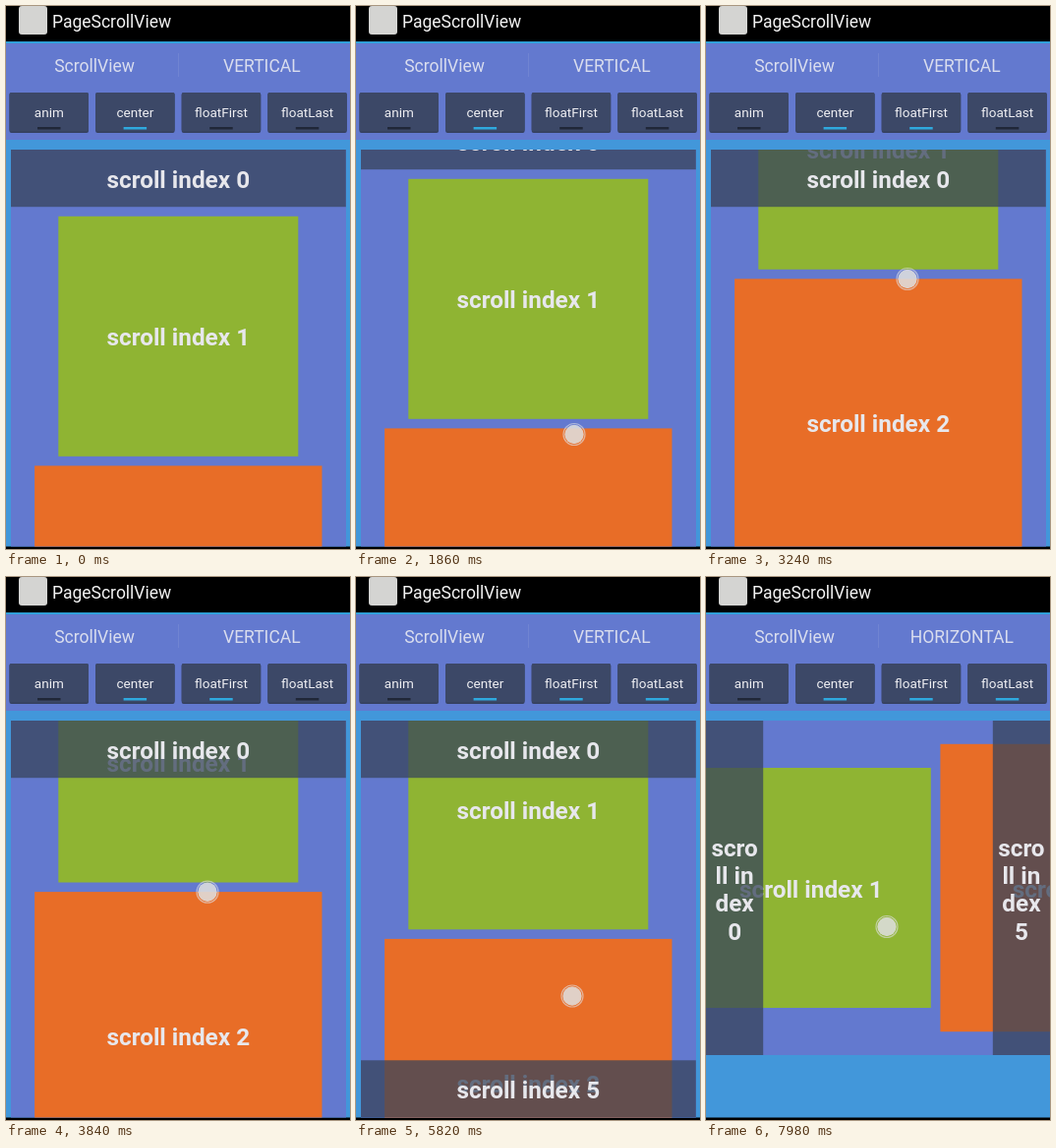
Animation, 350 px wide and 552 px high, one loop 8000 ms. Source, as an HTML page with a canvas:

```html
<!DOCTYPE html>
<html lang="en">
<head>
<meta charset="utf-8">
<title>PageScrollView</title>
<style>
html, body { margin: 0; width: 100%; height: 100%; overflow: hidden; background: #000; }
canvas { display: block; width: 350px; height: 552px; }
</style>
</head>
<body>
<canvas id="stage"></canvas>
<script>
const W = 350, H = 552, LOOP = 8000, STEP = 60;
const canvas = document.getElementById('stage');
const ratio = window.devicePixelRatio || 1;
canvas.width = W * ratio;
canvas.height = H * ratio;
const ctx = canvas.getContext('2d');
ctx.scale(ratio, ratio);

const PURPLE = '#6379cf', BLUE = '#4297da', GREEN = '#8fb433', ORANGE = '#e86d27';
const FLOAT = 'rgba(55,68,91,.75)', LABEL = '#e7e7ec';
const GAP = 9.6, BAR = 58.2, SMALL = 244, LARGE = 292.4;
const TOP = 146, BOTTOM = 549.5;
const FLOAT_FIRST_ON = 2520, FLOAT_LAST_ON = 4740, HORIZONTAL_ON = 7380;

// Scroll offset as [time, value]
const scrollKeys = [
  [660, 0], [960, 287], [1020, 292], [1320, 0],
  [1680, 0], [1860, 38], [2220, 82],
  [2940, 82], [3240, 190], [3420, 205], [3780, 150], [4080, 136.5],
  [5280, 136.5], [5820, 99.5], [6120, 76],
  [7860, 76], [7980, 83]
];

// Finger contacts; drags follow the scroll offset
const touches = [
  { from: 1740, to: 2220, fade: 60, at: (t, s) => [222, 473.5 - s] },
  { from: 2340, to: 2520, fade: 180, at: () => [226, 109] },
  { from: 3000, to: 4080, fade: 180, at: (t, s) => [205, 467.5 - s] },
  { from: 4560, to: 4680, fade: 180, at: () => [306, 109] },
  { from: 5340, to: 6120, fade: 240, at: (t, s) => [track([[5820, 220], [6120, 214.5]], t), 525.5 - s] },
  { from: 7200, to: 7320, fade: 180, at: () => [260, 61] },
  { from: 7920, to: 8000, fade: 60, at: (t, s) => [267 - s, 355.5] }
];

const items = [];
let offset = 0;
[BAR, SMALL, LARGE, SMALL, LARGE, BAR].forEach((size, i) => {
  const fill = size === BAR ? FLOAT : size === SMALL ? GREEN : ORANGE;
  items.push({ i, size, fill, pos: offset });
  offset += size + GAP;
});

function track(keys, t) {
  if (t <= keys[0][0]) return keys[0][1];
  for (let i = 1; i < keys.length; i++) {
    const [t0, a] = keys[i - 1], [t1, b] = keys[i];
    if (t <= t1) return a + (b - a) * (t - t0) / (t1 - t0);
  }
  return keys[keys.length - 1][1];
}

function rect(x, y, w, h, fill) {
  ctx.fillStyle = fill;
  ctx.fillRect(x, y, w, h);
}

function round(x, y, w, h, r, fill) {
  ctx.fillStyle = fill;
  ctx.beginPath();
  ctx.roundRect(x, y, w, h, r);
  ctx.fill();
}

function text(str, x, y, size, fill, align = 'center', weight = 400) {
  ctx.font = `${weight} ${size}px Roboto, sans-serif`;
  ctx.textAlign = align;
  ctx.fillStyle = fill;
  ctx.fillText(str, x, y);
}

const label = (str, x, y) => text(str, x, y, 24.3, LABEL, 'center', 700);

function drawItem(item, pos, horizontal) {
  const { i, size, fill } = item;
  const bar = size === BAR;
  const mid = pos + size / 2;
  if (horizontal) {
    const cross = bar ? 340 : size;
    rect(pos, 316 - cross / 2, size, cross, fill);
    if (bar) ['scro', 'll in', 'dex', i].forEach((s, n) => label(s, mid, 283.5 + n * 28.4));
    else label('scroll index ' + i, mid, 326);
  } else {
    const cross = bar ? 341 : size;
    rect(175.3 - cross / 2, pos, cross, size, fill);
    label('scroll index ' + i, 175.3, mid + 9.5);
  }
}

function drawPages(t, scroll) {
  const horizontal = t >= HORIZONTAL_ON;
  const start = horizontal ? 0 : TOP;
  const end = horizontal ? W : BOTTOM;
  const area = horizontal ? [0, TOP, W, 340] : [5, TOP, 341, BOTTOM - TOP];
  rect(0, 136, W, BOTTOM - 136, BLUE);
  rect(...area, PURPLE);
  ctx.save();
  ctx.beginPath();
  ctx.rect(...area);
  ctx.clip();
  const floating = { 0: t >= FLOAT_FIRST_ON, 5: t >= FLOAT_LAST_ON };
  for (const item of items)
    if (!floating[item.i]) drawItem(item, start + item.pos - scroll, horizontal);
  if (floating[0]) drawItem(items[0], start, horizontal);
  if (floating[5]) drawItem(items[5], end - BAR, horizontal);
  ctx.restore();
}

function drawHeader(t) {
  rect(0, 0, W, 36, '#000');
  rect(0, 36, W, 2, '#2f9fd8');
  round(13, 0, 29, 29, 3, '#d4d4d2');
  text('PageScrollView', 47, 22.3, 17.5, '#f2f2f2', 'left');

  rect(0, 38, W, 98, PURPLE);
  rect(175, 48, 1, 24, '#7084d2');
  text('ScrollView', 90, 67, 17.5, '#d9ddee');
  text(t >= HORIZONTAL_ON ? 'HORIZONTAL' : 'VERTICAL', 260.3, 67, 17.5, '#d9ddee');

  const buttons = [
    ['anim', false], ['center', true],
    ['floatFirst', t >= FLOAT_FIRST_ON], ['floatLast', t >= FLOAT_LAST_ON]
  ];
  buttons.forEach(([name, on], i) => {
    const x = 3.5 + i * 87.6;
    round(x, 88, 80.5, 41, 2, '#35405f');
    round(x, 88, 80.5, 39.5, 2, '#3c4867');
    text(name, x + 40.3, 112.8, 13.5, '#eeeef2');
    rect(x + 28.5, 123, 23.5, 2.5, on ? '#2fa9de' : '#202738');
  });
}

function drawTouch(t, scroll) {
  for (const { from, to, fade, at } of touches) {
    if (t < from || t >= to + fade) continue;
    const [x, y] = at(t, scroll);
    ctx.globalAlpha = t <= to ? 1 : 1 - (t - to) / fade;
    ctx.beginPath();
    ctx.arc(x, y, 9.7, 0, Math.PI * 2);
    ctx.fillStyle = 'rgba(222,222,222,.88)';
    ctx.fill();
    ctx.beginPath();
    ctx.arc(x, y, 11, 0, Math.PI * 2);
    ctx.strokeStyle = 'rgba(225,225,230,.6)';
    ctx.lineWidth = 1.2;
    ctx.stroke();
    ctx.globalAlpha = 1;
  }
}

function frame(now) {
  const t = Math.floor((now % LOOP) / STEP) * STEP;
  const scroll = track(scrollKeys, t);
  rect(0, 0, W, H, '#000');
  drawPages(t, scroll);
  drawHeader(t);
  drawTouch(t, scroll);
  requestAnimationFrame(frame);
}

frame(performance.now());
</script>
</body>
</html>
```
